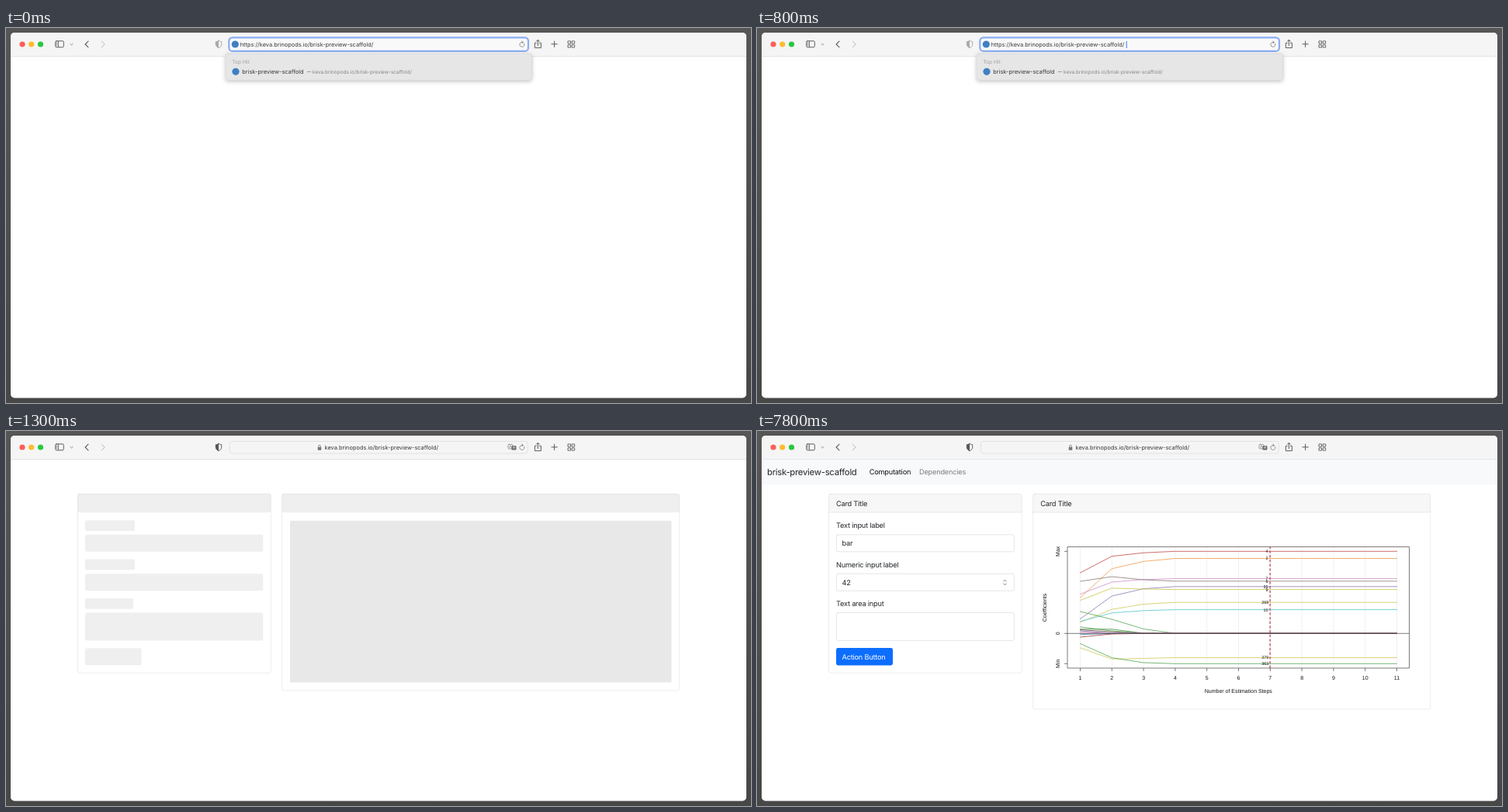
Animation of 960x484 px, one loop 9000 ms. Source, as an HTML page:

```html
<!DOCTYPE html>
<html lang="en">
<head>
<meta charset="utf-8">
<title>Loading skeleton</title>
<style>
  html, body { margin: 0; height: 100%; overflow: hidden; background: #4d4c4c; }
  svg { display: block; width: 100%; height: 100%; fill: none; stroke-linecap: round; stroke-linejoin: round; }
  text { font: 9.2px Inter, sans-serif; letter-spacing: -.022em; fill: #212529; text-rendering: geometricPrecision; }
  .url { font-size: 7.4px; letter-spacing: 0; fill: #383838; }
  .small { font-size: 6.45px; letter-spacing: 0; fill: #858585; }
  .icon { stroke: #5c5c5c; stroke-width: 1; }
  .card { stroke: #000; stroke-opacity: .125; stroke-width: .6; }
  .field { fill: #fff; stroke: #ced4da; stroke-width: .6; }
  #chart text { font: 7px "Liberation Sans", Arial, sans-serif; letter-spacing: 0; fill: #111; text-anchor: middle; }
  #chart .tag { font-size: 5.4px; }
  #chart .axis { stroke: #444; stroke-width: .7; stroke-linecap: butt; }
</style>
</head>
<body>
<svg viewBox="0 0 960 484" preserveAspectRatio="none">
  <defs>
    <linearGradient id="desk" x2="0" y2="1"><stop stop-color="#575656"/><stop offset="1" stop-color="#474747"/></linearGradient>
    <filter id="shade" x="-5%" y="-20%" width="110%" height="160%"><feDropShadow dx="0" dy="1.5" stdDeviation="2.5" flood-opacity=".25"/></filter>
    <clipPath id="win"><rect x="6" y="6" width="948" height="471.5" rx="5"/></clipPath>
    <path id="shield" d="M274 16.4c1.2.8 2.4 1.1 3.7 1.2v3.6c0 2-1.500 3.400-3.700 4.500c-2.200-1.100-3.700-2.500-3.700-4.500v-3.600c1.300-.1 2.500-.4 3.700-1.200z"/>
    <g id="reload" stroke="#777" stroke-width=".8"><path d="M667.700 20.200a3 3 0 1 1-2.700-1.800h1.200M664.900 16.900l1.500 1.500-1.500 1.500"/></g>
    <g id="lock"><rect x="-2.300" y="20.700" width="4.600" height="4" rx=".7" fill="#777"/><path d="M-1.400 20.800v-1.200a1.400 1.400 0 0 1 2.800 0v1.200" stroke="#777" stroke-width=".8"/></g>
  </defs>

  <rect width="960" height="484" fill="url(#desk)"/>
  <g clip-path="url(#win)">
    <rect x="6" y="6" width="948" height="472" fill="#fff"/>
    <rect x="6" y="6" width="948" height="31" fill="#f5f5f5"/>
    <path d="M6 36.700h948" stroke="#dcdcdc" stroke-width=".7"/>
  </g>
  <circle cx="21" cy="21" r="3.600" fill="#fe5f57"/>
  <circle cx="32.700" cy="21" r="3.600" fill="#febc2e"/>
  <circle cx="44.500" cy="21" r="3.600" fill="#28c840"/>
  <g class="icon">
    <rect x="63.700" y="16.800" width="10.600" height="8" rx="1.400"/>
    <path d="M67.500 17v7.600M65 19h1M65 20.700h1M65 22.400h1" stroke-width=".8"/>
    <path d="M82.900 20.400l1.600 1.500 1.600-1.500" stroke="#888"/>
    <path d="M106 17.200l-3.900 3.800 3.900 3.800" stroke-width="1.100"/>
    <path d="M123.300 17.200l3.900 3.800-3.900 3.800" stroke="#b8b8b8"/>
    <path d="M683.300 19.300h-1.900v6.300h8v-6.300h-1.900M685.400 22.600v-7.200M683.300 17.300l2.100-2.100 2.100 2.100"/>
    <path d="M702.900 20.800h7.400M706.600 17.100v7.400"/>
    <path d="M724.400 16.900h3.200v3.200h-3.200zM729.500 16.900h3.200v3.200h-3.200zM724.400 21.900h3.200v3.200h-3.200zM729.500 21.900h3.200v3.200h-3.200z" stroke-width=".9"/>
  </g>

  <g id="entry">
    <use href="#shield" stroke="#999" stroke-width=".8"/>
    <path d="M274 16.400v9.300c-2.200-1.100-3.700-2.500-3.700-4.500v-3.600c1.300-.1 2.500-.4 3.700-1.200z" fill="#aaa"/>
    <rect x="287.300" y="12.300" width="385.700" height="17.600" rx="4.500" fill="#f9f9f9" stroke="#8badf2" stroke-width="2.200"/>
    <circle cx="295.300" cy="21" r="4.600" fill="#3f7fc4"/>
    <text class="url" x="301.700" y="24">https://keva.brinopods.io/brisk-preview-scaffold/</text>
    <path id="caret" d="M476.200 17v9" stroke="#3478f6" stroke-linecap="butt"/>
    <use href="#reload"/>
    <rect x="283" y="33" width="394.500" height="34.300" rx="3.500" fill="#e6e6e6" stroke="#cfcfcf" stroke-width=".5" filter="url(#shade)"/>
    <text class="small" x="291.300" y="46" style="fill:#a0a0a0;font-size:6.6px">Top Hit</text>
    <circle cx="296" cy="56.300" r="4.600" fill="#3f7fc4"/>
    <text class="url" x="304.300" y="58.700">brisk-preview-scaffold</text>
    <path d="M388.200 56.500h4.600" stroke="#858585" stroke-width=".7"/>
    <text class="small" x="395" y="58.600">keva.brinopods.io/brisk-preview-scaffold/</text>
  </g>

  <g id="visited">
    <use href="#shield" stroke="#555" stroke-width=".9"/>
    <path d="M274 16.400v9.300c-2.200-1.100-3.700-2.500-3.700-4.500v-3.600c1.300-.1 2.500-.4 3.700-1.200z" fill="#555"/>
    <rect x="288.300" y="13.300" width="384" height="15.700" rx="3.500" fill="#f5f5f5" stroke="#d8d8d8" stroke-width=".7"/>
    <g id="address">
      <use href="#lock" x="404"/>
      <text class="url" x="410.500" y="24">keva.brinopods.io/brisk-preview-scaffold/</text>
    </g>
    <rect x="647" y="17.300" width="6" height="5.600" rx="1.200" stroke="#777" stroke-width=".7"/>
    <path d="M648.600 21.700l1.400-3.200 1.400 3.200" stroke="#777" stroke-width=".6"/>
    <rect x="651.500" y="18.900" width="6" height="5.600" rx="1.200" fill="#666"/>
    <path d="M653 20.700h3M654.500 19.900v.8M653.300 23l2.200-2.200M655.800 23l-2-1.700" stroke="#f5f5f5" stroke-width=".5"/>
    <g id="busy">
      <path d="M290 28.500h103" stroke="#2f72dd" stroke-width="1.300" stroke-linecap="butt"/>
      <path class="icon" d="M662.700 18.700l4.600 4.600M667.300 18.700l-4.600 4.600" style="stroke-width:.8"/>
    </g>
    <use id="idle" href="#reload"/>
  </g>

  <g id="skeleton">
    <g id="blocks" fill="#000" fill-opacity=".0627"></g>
    <rect x="366" y="115.700" width="491.500" height="208.700" rx="1.500" fill="#000" fill-opacity=".09"/>
    <rect class="card" x="92.500" y="81.300" width="248.700" height="230.900" rx="2.400"/>
    <rect class="card" x="355.700" y="81.300" width="512" height="253.700" rx="2.400"/>
  </g>

  <g id="app">
    <rect x="6" y="37" width="948" height="32" fill="#f8f9fa"/>
    <text x="13" y="57" style="font-size:11.3px">brisk-preview-scaffold</text>
    <text x="144.700" y="56.400" style="fill:#111">Computation</text>
    <text x="209" y="56.400" style="fill:#7d7e80">Dependencies</text>
    <path d="M92.500 105V83.700q0-2.400 2.400-2.400h243.900q2.400 0 2.400 2.400V105zM355.700 105V83.700q0-2.400 2.400-2.400h507.200q2.400 0 2.400 2.400V105z" fill="#f7f7f7"/>
    <path class="card" d="M92.500 105h248.700M355.700 105h512"/>
    <rect class="card" x="92.500" y="81.300" width="248.700" height="230.900" rx="2.400"/>
    <rect class="card" x="355.700" y="81.300" width="512" height="277.700" rx="2.400"/>
    <text x="102" y="96.700">Card Title</text>
    <text x="365.300" y="96.700">Card Title</text>
    <text x="102" y="125.300">Text input label</text>
    <rect class="field" x="102.300" y="133.800" width="229" height="22" rx="2.400"/>
    <text x="109.500" y="148.200">bar</text>
    <text x="102" y="175.700">Numeric input label</text>
    <rect class="field" x="102.300" y="184.200" width="229" height="22" rx="2.400"/>
    <text x="109.500" y="198.600">42</text>
    <path class="icon" d="M317.700 194l1.700-1.800 1.700 1.800M317.700 197l1.700 1.800 1.700-1.800" style="stroke-width:.8"/>
    <text x="102" y="226.100">Text area input</text>
    <rect class="field" x="102.300" y="234.600" width="229" height="35.800" rx="2.400"/>
    <rect x="102" y="280" width="73" height="22.500" rx="2.400" fill="#0d6efd"/>
    <text x="109.500" y="294.600" style="fill:#fff">Action Button</text>
    <g id="chart"></g>
  </g>
</svg>

<script>
const $ = id => document.getElementById(id);
const show = (id, on) => $(id).style.display = on ? "" : "none";

// Skeleton placeholders: x, y, width, height
$("blocks").innerHTML = [
  [92.5, 81.3, 248.7, 24], [355.7, 81.3, 512, 24],
  [102, 115.3, 64, 13.6], [102, 133.8, 229.3, 22],
  [102, 165.6, 64, 13.6], [102, 184.2, 229.3, 22],
  [102, 216, 62.3, 13.8], [102, 234.6, 229.3, 35.8],
  [102, 280.2, 72.6, 22]
].map(([x, y, w, h]) => `<rect x="${x}" y="${y}" width="${w}" height="${h}" rx="2"/>`).join("");

// Coefficient paths: colour, heights at steps 1 to 4 (flat afterwards), label
const series = [
  ["#c04a48", [183, 161.7, 157.2, 155.3], 4],
  ["#ef9a4d", [215, 177.7, 168.3, 164.5], 2],
  ["#d38fcb", [210.5, 195, 191.7, 190.5], 7],
  ["#8a7975", [194, 188, 192, 193.8], 6],
  ["#8b7bb0", [242.5, 213, 203.6, 200.8], 35],
  ["#c9c44f", [218.5, 202.8, 204, 204.6], 9],
  ["#cdc95a", [247, 230.2, 223.5, 221.2], 269],
  ["#55c3d0", [245.7, 234.8, 231.8, 230.6], 10],
  ["#cdc95a", [279.8, 294.3, 293.5, 292.5], 379],
  ["#53a653", [274.5, 292.6, 299, 300.3], 363],
  ["#53a653", [233, 243, 255.5, 261.2]],
  ["#53a653", [252.8, 258, 261.2, 261.2]],
  ["#3f8f3f", [255.7, 255.8, 261, 261.2]],
  ["#6b4a42", [256.6, 259, 261.2, 261.2]],
  ["#7a5a98", [258, 260.8, 261.2, 261.2]],
  ["#cc79b4", [260, 261.2, 261.2, 261.2]],
  ["#3d7fb0", [262.7, 261.4, 261.2, 261.2]],
  ["#a83836", [266, 262, 261.2, 261.2]]
];
const stepX = k => 416.5 + 40.8 * (k - 1);
const line = (d, attrs) => `<path d="${d}" ${attrs}/>`;
const label = (x, y, s, attrs = "") => `<text x="${x}" y="${y}" ${attrs}>${s}</text>`;
const upright = (x, y, s) => label(0, 0, s, `transform="translate(${x} ${y}) rotate(-90)"`);
const steps = Array.from({ length: 11 }, (_, i) => i + 1);

let chart = steps.map(k => line(`M${stepX(k)} 149.500V306`, 'stroke="#e6e6e6" stroke-width=".6"')).join("");
for (const [color, ys] of series) {
  const points = steps.map(k => `${stepX(k)} ${ys[Math.min(k, 4) - 1]}`);
  chart += line("M" + points.join("L"), `stroke="${color}" stroke-width=".8"`);
}
chart += line("M400 261.300H840.500", 'class="axis"');
chart += line("M661.100 306V149.500", 'stroke="#b5323e" stroke-width="1.100" stroke-dasharray="3.400 2.300" stroke-linecap="butt"');
for (const [, ys, name] of series)
  if (name) chart += label(name > 99 ? 654.7 : name > 9 ? 655.6 : 657, ys[3] + 1.9, name, 'class="tag"');
chart += line("M400 149.500H840.500V306H400z", 'class="axis"');
for (const k of steps)
  chart += line(`M${stepX(k)} 306v4`, 'class="axis"') + label(stepX(k), 321.3, k);
for (const [y, s] of [[155.3, "Max"], [261.3, "0"], [300.3, "Min"]])
  chart += line(`M400 ${y}h-4`, 'class="axis"') + upright(390.3, y, s);
chart += label(620.3, 338.3, "Number of Estimation Steps") + upright(373.3, 228, "Coefficients");
$("chart").innerHTML = chart;

function draw() {
  const t = performance.now() % 9000;
  const typing = t < 1200, busy = t < 1300, ready = t >= 7500;
  show("entry", typing);
  show("caret", (t >= 300 && t < 500) || (t >= 800 && t < 900));
  show("visited", !typing);
  show("busy", busy);
  show("idle", !busy);
  $("address").setAttribute("transform", `translate(${busy ? -4.5 : 0} 0)`);
  show("skeleton", !typing && !ready);
  $("skeleton").setAttribute("opacity", busy ? .66 : 1);
  show("app", ready);
  requestAnimationFrame(draw);
}
draw();
</script>
</body>
</html>
```
